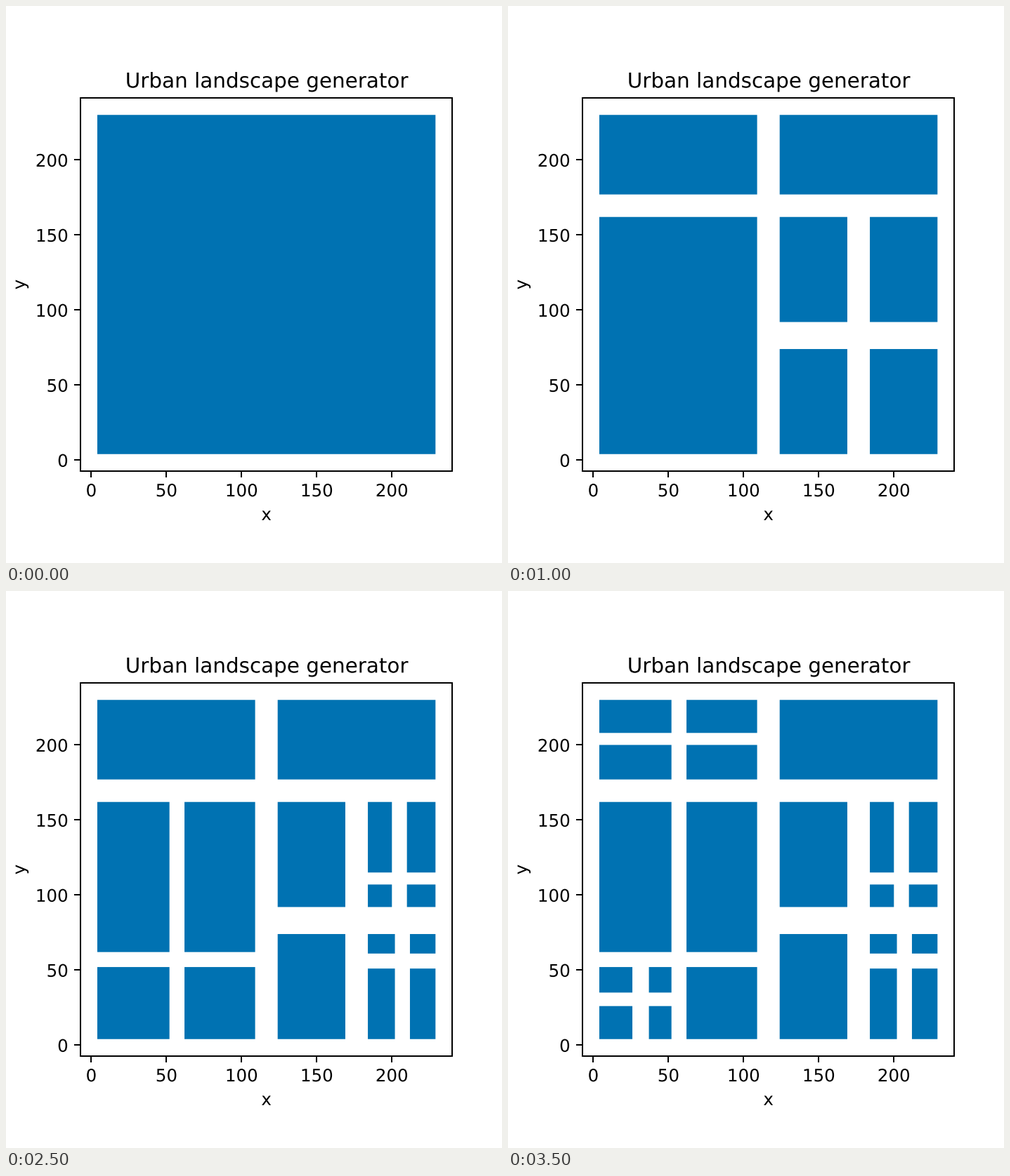
A matplotlib script that plays this animation: 706x794 px, repeating every 4500 ms.

```python
import matplotlib.pyplot as plt
from matplotlib.animation import FuncAnimation
from matplotlib.patches import Rectangle
from matplotlib.patheffects import Normal
from matplotlib.text import Text

DPI = 176.5
STEP_MS = 500
HOLD_STEPS = 1
BLUE = "#0072B2"

CITY = (4, 4, 229, 230)  # x0, y0, x1, y1
# Street crossings in building order: lower left corner, then street widths.
CROSSINGS = [
    (109, 162, 15, 15),
    (169, 74, 15, 18),
    (202, 51, 10, 10),
    (200, 107, 10, 8),
    (52, 52, 10, 10),
    (26, 26, 11, 9),
    (52, 200, 10, 8),
]


def contains(block, x, y):
    x0, y0, x1, y1 = block
    return x0 < x < x1 and y0 < y < y1


def split(block, crossing):
    """Cut a block into four around a crossing; leave other blocks whole."""
    x, y, width, height = crossing
    if not contains(block, x, y):
        return [block]
    x0, y0, x1, y1 = block
    return [(left, low, right, high)
            for left, right in ((x0, x), (x + width, x1))
            for low, high in ((y0, y), (y + height, y1))]


def blocks_at(step):
    blocks = [CITY]
    for crossing in CROSSINGS[:step]:
        blocks = [part for block in blocks for part in split(block, crossing)]
    return blocks


def draw(step):
    for patch in list(ax.patches):
        patch.remove()
    for x0, y0, x1, y1 in blocks_at(step):
        ax.add_patch(Rectangle((x0, y0), x1 - x0, y1 - y0,
                               facecolor=BLUE, linewidth=0, snap=False))
    return ax.patches


plt.rcParams.update({
    "font.family": "DejaVu Sans",
    "axes.linewidth": 0.82,
    "xtick.major.width": 0.82,
    "ytick.major.width": 0.82,
})
# The tiny surplus keeps the pixel size from being floored below 706 x 794.
fig = plt.figure(figsize=(706.001 / DPI, 794.001 / DPI), dpi=DPI,
                 facecolor="white")
ax = fig.add_axes([0.15, 0.1, 0.75, 0.8], aspect="equal")
ax.update_datalim([CITY[:2], CITY[2:]])
ax.autoscale_view()
ax.set(title="Urban landscape generator", xlabel="x", ylabel="y",
       xticks=range(0, 201, 50), yticks=range(0, 201, 50))

# Path effects draw text as outlines, free of pixel hinting.
for text in fig.findobj(Text):
    text.set_path_effects([Normal()])

anim = FuncAnimation(fig, draw, frames=len(CROSSINGS) + 1 + HOLD_STEPS,
                     interval=STEP_MS, init_func=lambda: draw(0),
                     repeat=True, repeat_delay=0, blit=False)
plt.show()
```
